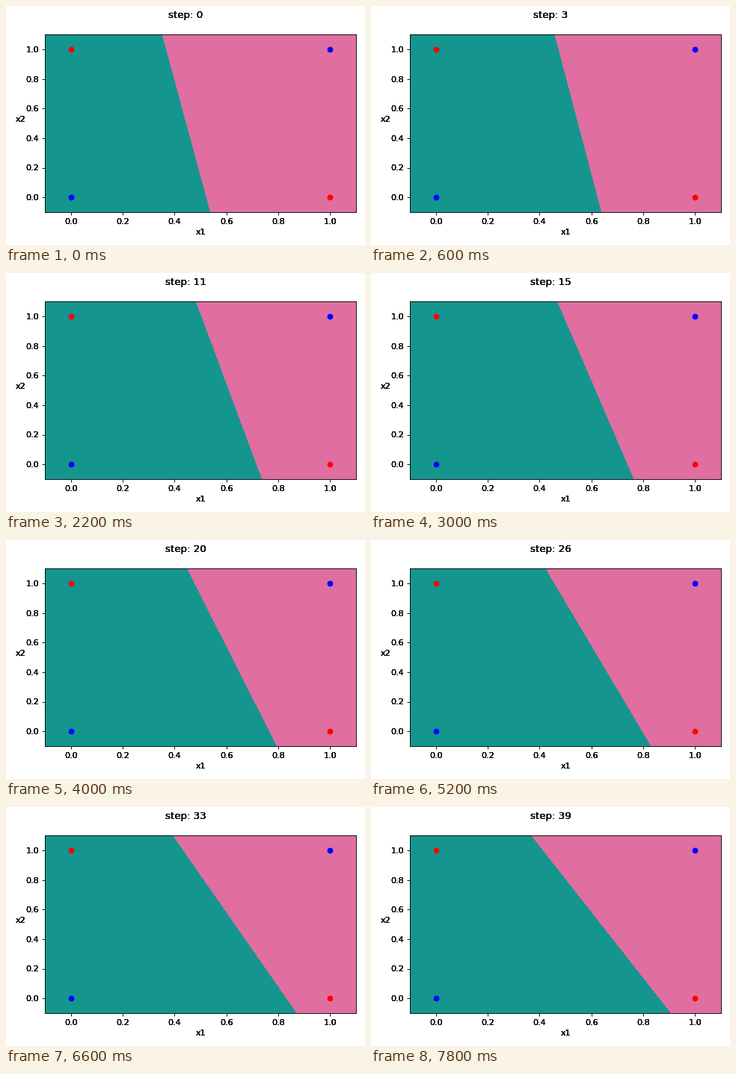
A matplotlib script for the animation above (8000 ms loop, 480x320 px).

```python
import matplotlib.pyplot as plt
from matplotlib.animation import FuncAnimation

W, H, DPI = 480, 320, 80
LEFT, RIGHT, TOP, BOTTOM = 52, 468, 38, 276
LO, HI = -0.1, 1.1
STEPS = 40
TEAL, PINK = "#14968f", "#e06ea0"
TICKS = [0, 0.2, 0.4, 0.6, 0.8, 1.0]

plt.rcParams["font.family"] = "DejaVu Sans"
fig = plt.figure(figsize=(W / DPI, H / DPI), dpi=DPI, facecolor="white")
ax = fig.add_axes([LEFT / W, 1 - BOTTOM / H, (RIGHT - LEFT) / W, (BOTTOM - TOP) / H])
ax.set(xlim=(LO, HI), ylim=(LO, HI), xticks=TICKS, yticks=TICKS, facecolor=PINK)
ax.tick_params(labelbottom=False, labelleft=False)


def label(x, y, text, size=10, **align):
    """Dense text at pixel (x, y): overlaid copies harden the soft edges."""
    return [fig.text(x / W, 1 - y / H, text, size=size, **align) for _ in range(4)]


for t in TICKS:
    share = (t - LO) / (HI - LO)
    label(LEFT + share * (RIGHT - LEFT), BOTTOM + 7.8, f"{t:.1f}", ha="center", va="top")
    label(LEFT - 7.8, BOTTOM - share * (BOTTOM - TOP), f"{t:.1f}",
          ha="right", va="center_baseline")
label(260, 306, "x1", ha="center", va="baseline")
label(19.2, 157, "x2", ha="center", va="bottom")
title = label(240, 6.4, "", size=12, ha="center", va="top")

region, = ax.fill([LO] * 4, [LO, HI, HI, LO], color=TEAL, lw=0, antialiased=False)
ax.scatter([0, 1], [0, 1], color="blue", zorder=3)
ax.scatter([0, 1], [1, 0], color="red", zorder=3)


def to_x(px):
    return LO + (px - LEFT) / (RIGHT - LEFT) * (HI - LO)


def boundary(step):
    """Where the decision line meets the top and bottom edges."""
    top = 270.5 - 1.47 * step - 62.5 * 0.698 ** step
    bottom = 320.8 + 2.03 * step - 48.3 * 0.738 ** step
    return to_x(top), to_x(bottom)


def update(step):
    top, bottom = boundary(step)
    region.set_xy([(LO, LO), (LO, HI), (top, HI), (bottom, LO)])
    for copy in title:
        copy.set_text(f"step: {step}")
    return [region, *title]


anim = FuncAnimation(fig, update, frames=STEPS, init_func=lambda: update(0),
                     interval=200, repeat=True, repeat_delay=0, blit=False)
plt.show()
```
